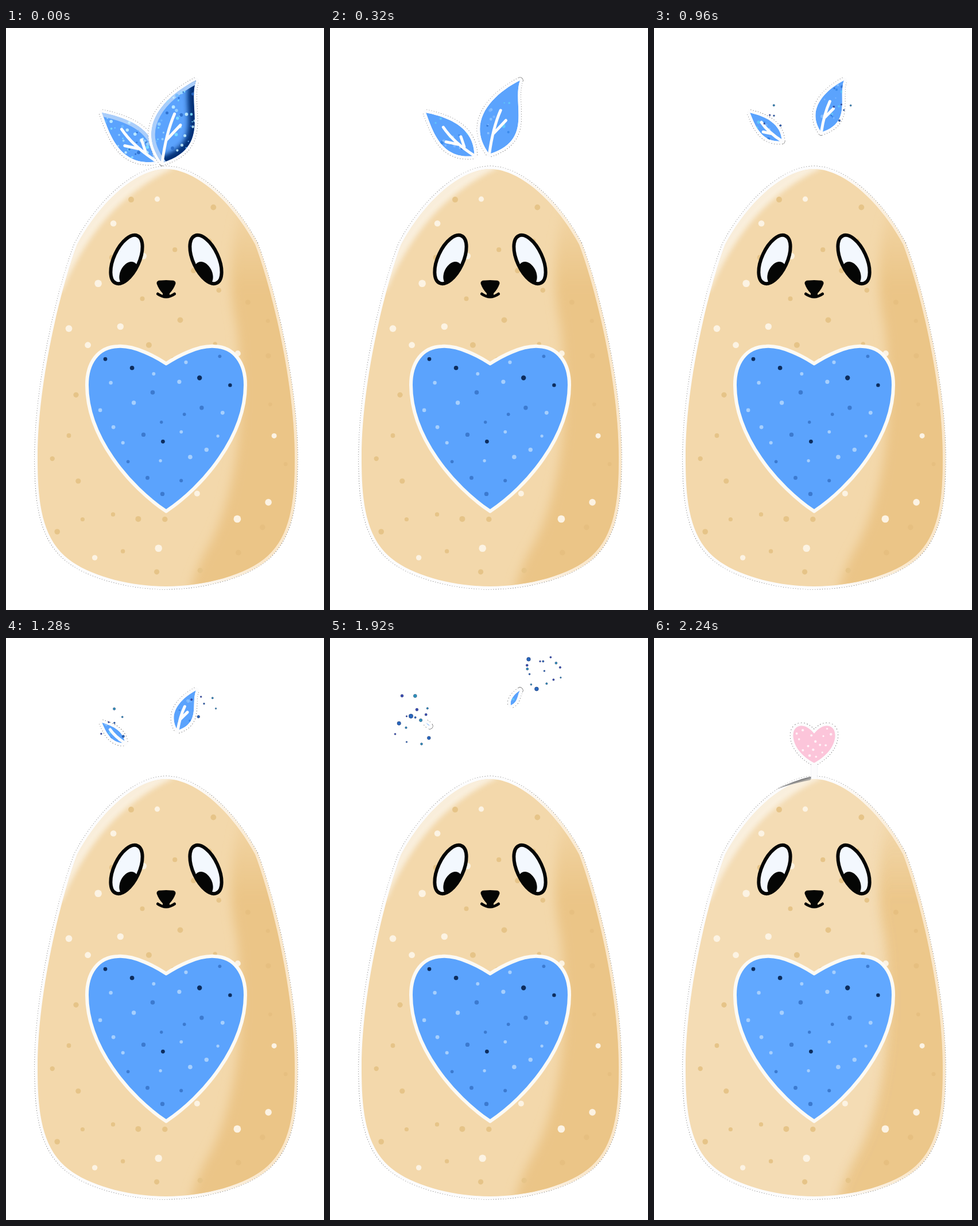
Recreate the animation shown at these times as an HTML page. Size 554 px wide and 1011 px high, loop 2560 ms.

```html
<!DOCTYPE html>
<html lang="en">
<head>
<meta charset="utf-8">
<title>Sprout</title>
<style>
  html, body { margin: 0; width: 100%; height: 100%; overflow: hidden; background: #fff; }
  svg { display: block; width: 100%; height: 100%; }
</style>
</head>
<body>
<svg id="stage" viewBox="0 0 554 1011" xmlns="http://www.w3.org/2000/svg"></svg>
<script>
const STEP = 320, STEPS = 8, MID = 279, W = 554, H = 1011;
const RIM = '#fcfcfd', BLUE = '#5ba3fd', INK = '#050605';
const stage = document.getElementById('stage');
const probe = document.createElement('canvas').getContext('2d');

const lerp = (a, b, t) => a + (b - a) * t;
const mix = (p, q, t) => p.map((n, i) => lerp(n, q[i], t));
const path = (d, attrs) => `<path d="${d}" ${attrs}/>`;
const dot = (x, y, r, fill, more = '') =>
  `<circle cx="${x.toFixed(1)}" cy="${y.toFixed(1)}" r="${r.toFixed(1)}" fill="${fill}" ${more}/>`;
const line = (d, color, width, more = '') =>
  path(d, `fill="none" stroke="${color}" stroke-width="${width}" stroke-linecap="round" ${more}`);

function rng(seed) {
  return () => (seed = (seed * 16807) % 2147483647) / 2147483647;
}

// Random points inside a shape, kept apart from each other and from its edge.
function scatter(shape, count, gap, margin, seed) {
  const region = new Path2D(shape), rand = rng(seed), pts = [];
  probe.lineWidth = 2 * margin;
  for (let tries = 0; pts.length < count && tries < 20000; tries++) {
    const x = rand() * W, y = rand() * H;
    if (probe.isPointInPath(region, x, y) && !probe.isPointInStroke(region, x, y) &&
        pts.every(p => Math.hypot(p.x - x, p.y - y) > gap)) pts.push({ x, y, k: .8 + .4 * rand() });
  }
  return pts;
}

// Cubic chain down the right side, mirrored back up the left.
function symmetric(pts) {
  const back = pts.slice(0, -1).reverse().map(([x, y]) => [2 * MID - x, y]);
  return `M${pts[0]}C${pts.slice(1).join(' ')} ${back.join(' ')}Z`;
}

// White sticker border with a fine dotted edge.
const sticker = (d, rim = RIM) =>
  line(d, '#4c4c4c', 11.2, 'style="stroke-linecap:butt" stroke-dasharray="1.2 3" stroke-linejoin="round"') +
  path(d, `fill="${rim}" stroke="${rim}" stroke-width="10" stroke-linejoin="round"`);

// ---- body -----------------------------------------------------------
const body = symmetric([[279, 245], [330, 245], [393, 300], [434, 376], [464, 455], [503, 618], [503, 745],
  [503, 812], [499, 878], [456, 917], [420, 950], [345, 970], [279, 970]]);
const heart = symmetric([[279, 583], [296, 572], [333, 551], [363, 553], [398, 554], [417, 582], [417, 620],
  [417, 710], [343, 797], [279, 839.5]]);
const smallHeart = symmetric([[279, 166], [288, 155], [296, 152], [302, 152.5], [311, 153], [316, 160], [315.5, 171],
  [314, 192], [296, 208], [279, 217]]);

const speckle = scatter(body, 56, 38, 12, 4242).map(({ x, y, k }, i) => i % 3
  ? dot(x, y, 4.2 * k, x > 400 ? '#e6bf80' : '#e6c488')
  : dot(x, y, 5.4 * k, '#fcf3e3')).join('');
const heartDots = scatter(heart, 29, 30, 14, 88).map(({ x, y, k }, i) =>
  i % 6 === 0 ? dot(x, y, 3.9 * k, '#0d2d5e')
    : dot(x, y, 3.3 * k, i % 2 ? '#a6cffd' : '#3c7acf')).join('');
const pinkDots = scatter(smallHeart, 16, 10, 5, 31).map(({ x, y, k }) => dot(x, y, 1.9 * k, '#fff2f7')).join('');

const defs = `<defs>
  <clipPath id="bodyClip"><path d="${body}"/></clipPath>
  <clipPath id="eyeClip"><ellipse rx="22" ry="45.3"/></clipPath>
  <filter id="soft" x="-30%" y="-30%" width="160%" height="160%"><feGaussianBlur stdDeviation="9"/></filter>
  <filter id="soft4" x="-50%" y="-50%" width="200%" height="200%"><feGaussianBlur stdDeviation="4"/></filter>
  <linearGradient id="fade" gradientUnits="userSpaceOnUse" x1="0" y1="290" x2="0" y2="450">
    <stop offset="0" stop-color="#ebc587" stop-opacity="0"/><stop offset="1" stop-color="#ebc587"/>
  </linearGradient>
  <linearGradient id="rim" gradientUnits="userSpaceOnUse" x1="320" y1="0" x2="450" y2="0">
    <stop offset="0" stop-color="${RIM}"/><stop offset="1" stop-color="#fae7ca"/>
  </linearGradient>
  <linearGradient id="gray" gradientUnits="userSpaceOnUse" x1="243" y1="249" x2="247" y2="262">
    <stop offset="0" stop-color="#666"/><stop offset="1" stop-color="#bbb" stop-opacity="0"/>
  </linearGradient>
</defs>`;

const eye = side => `
  <g transform="translate(${MID + 69 * side} 402) rotate(${-25 * side})">
    <ellipse rx="22" ry="45.3" fill="#f3f8fe"/>
    <g clip-path="url(#eyeClip)"><ellipse cx="${-14 * side}" cy="21" rx="15" ry="22" fill="${INK}"/></g>
    <ellipse rx="22" ry="45.3" fill="none" stroke="${INK}" stroke-width="6"/>
  </g>`;

const drawBody = last => sticker(body, 'url(#rim)') +
  path(body, `fill="${last ? '#f4dcb4' : '#f3d8ab'}"`) +
  `<g clip-path="url(#bodyClip)">
    ${path('M412 290Q378 420 402 520Q414 640 404 720Q390 840 347 910Q326 950 318 990H570V290Z',
      `fill="url(#fade)" filter="url(#soft)" opacity="${last ? .92 : 1}"`)}
    ${path('M292 243Q215 280 165 342Q125 392 97 458L50 420L150 250L270 220Z', 'fill="#fbf4e8" opacity=".8" filter="url(#soft4)"')}
  </g>` + speckle + eye(-1) + eye(1) +
  path('M262.5 444Q262 438 270 438.5Q279 437.5 288 438.5Q296 438 295.5 444Q292 454 285 461V466H273V461Q266 454 262.5 444Z', `fill="${INK}"`) +
  line('M264.5 462Q279 472 293.5 462', INK, 5) +
  path(heart, `fill="${last ? '#61a8ff' : BLUE}" stroke="#fcfaf5" stroke-width="6" stroke-linejoin="round"`) + heartDots;

// ---- leaves ---------------------------------------------------------
// Outline and veins are [along, across] in the frame from tip to base;
// the base draws back toward the tip.
const leaves = [
  {
    tip: [167, 147], base: [263, 232], end: [174, 153],
    lit: [[.35, -.2], [.72, -.31]], shade: [[.25, .13], [.66, .4]],
    stem: [[.35, -.01], [.62, .06]],
    twigs: [[[.53, .13], [.69, .04]], [[.65, -.08], [.79, 0]]],
    drift: [[228, 157], [145, 138]]
  },
  {
    tip: [331, 91], base: [272, 234], end: [315, 117],
    lit: [[.3, .25], [.75, .42]], shade: [[.32, -.02], [.62, -.44]],
    stem: [[.44, .08], [.68, .085]],
    twigs: [[[.53, -.03], [.74, .05]]],
    drift: [[316, 170], [372, 55]]
  }
];

function drawLeaf({ tip, base: start, end, lit, shade, stem, twigs }, step, id) {
  const base = mix(start, end, (step / 6) ** 1.15);
  const dx = base[0] - tip[0], dy = base[1] - tip[1], size = Math.hypot(dx, dy);
  const at = ([u, v]) => [tip[0] + u * dx - v * dy, tip[1] + u * dy + v * dx];
  const girth = Math.max(.3, 1.15 - 17 / size);
  const curve = c => c.map(([u, v]) => at([u, v * girth]));
  const edge = c => `M${tip}C${curve(c).join(' ')} ${base}`;
  const outline = edge(lit) + `C${curve(shade).reverse().join(' ')} ${tip}Z`;

  const first = step === 0, rand = rng(977 + step * 131 + id * 57);
  const tints = first ? ['#9ed8ff', '#c9f4ff', '#6fb9ff', '#7fe3ff', '#2a6cc9']
    : ['#8cc4ff', '#62cdf8', '#2f72d2', '#7db8ff', '#3587e8'];
  let glitter = '';
  for (let i = 0; i < size / (first ? 2.6 : 5.5) - 4; i++) {
    const [x, y] = at([.1 + .72 * rand(), (rand() - .5) * .42]);
    glitter += dot(x, y, 1 + 2 * rand(), tints[i % 5], 'opacity=".85"');
  }
  const dark = first && id ? line(edge(shade), '#052f74', 22, 'filter="url(#soft4)"') : '';
  const light = first ? line(edge(lit), '#abcefa', 13) : '';
  let veins = size > 45 ? `M${at(stem[0])}Q${at(stem[1])} ${base}` : '';
  for (const [a, b] of twigs.slice(0, Math.max(0, Math.floor((size - 25) / 40)))) veins += `M${at(a)}L${at(b)}`;

  return sticker(outline) +
    `<clipPath id="leaf${id}"><path d="${outline}"/></clipPath>
    <g clip-path="url(#leaf${id})">${path(outline, `fill="${BLUE}"`)}${dark}${light}${glitter}</g>` +
    line(veins, RIM, 5);
}

// Specks that fly off each leaf, more and wider with every step.
function drawSpecks({ drift }, step, id) {
  if (step < 2) return '';
  const t = (step - 2) / 4, [cx, cy] = mix(...drift, t);
  const reach = lerp(16, id ? 36 : 52, t), rand = rng(611 + 90 * id);
  let out = '';
  for (let i = 0; i < 4 + 11 * t ** 3; i++) {
    const far = reach * Math.sqrt(rand()), turn = i * 2.4 + id;
    out += dot(cx + far * Math.cos(turn), cy + far * Math.sin(turn), 1.2 + 2.8 * t * rand() ** 2,
      ['#2867bd', '#3a49b4', '#2c96bd'][i % 3], 'stroke="#24386f" stroke-width=".6"');
  }
  return out;
}

// ---- pink heart on its stem -----------------------------------------
const drawTopper = () =>
  path('M213 263Q244 247 277 240L272 247Q240 253 213 263Z', 'fill="url(#gray)"') +
  sticker(smallHeart) + path('M273.5 220h11v24h-11z', 'fill="#e6e9ee"') + path('M274 218h10v26h-10z', `fill="${RIM}"`) +
  path(smallHeart, 'fill="#fcc5da"') + pinkDots;

function render(step) {
  const last = step === STEPS - 1;
  const top = last ? drawTopper()
    : leaves.map((leaf, i) => drawLeaf(leaf, step, i) + drawSpecks(leaf, step, i)).join('');
  stage.innerHTML = defs + drawBody(last) + top;
}

let shown = -1;
const start = performance.now();
function tick(now) {
  const step = Math.floor(Math.max(0, now - start) / STEP) % STEPS;
  if (step !== shown) render(shown = step);
  requestAnimationFrame(tick);
}
tick(start);
</script>
</body>
</html>
```
